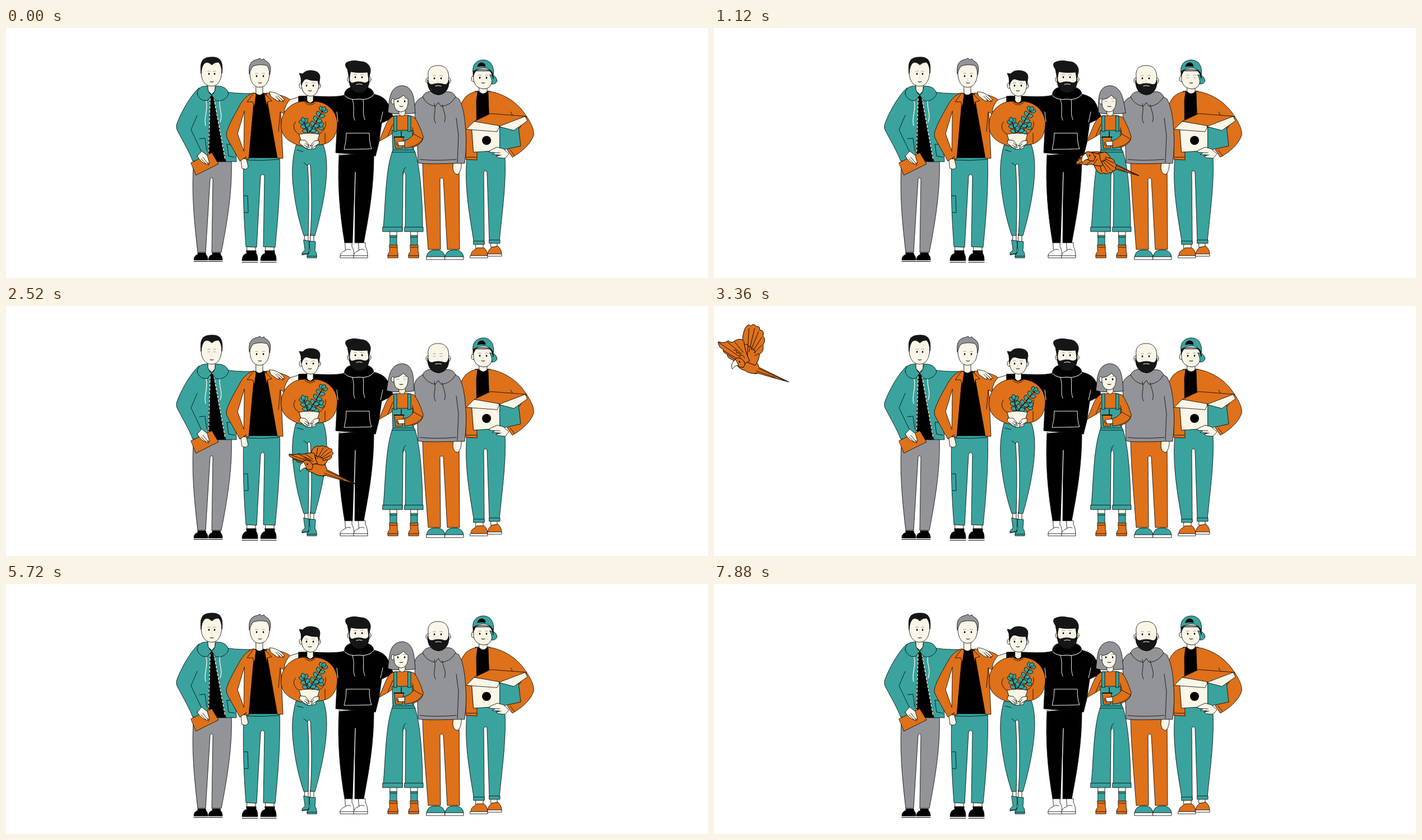
An HTML page with a canvas that plays this animation: 1252x447 px, repeating every 8 s.

```html
<!DOCTYPE html>
<html lang="en">
<head>
<meta charset="utf-8">
<title>Team and parrot</title>
<style>
html, body { margin: 0; width: 100%; height: 100%; overflow: hidden; background: #fff; }
canvas { display: block; width: 1252px; height: 447px; }
</style>
</head>
<body>
<canvas id="stage" width="1252" height="447"></canvas>
<script>
const c = document.getElementById('stage').getContext('2d');
const TEAL = '#3aa39e', ORANGE = '#de711a', GREY = '#939498', CREAM = '#f9f5e7';
const BLACK = '#000', HAIR = '#161616', WHITE = '#fff', LOOP = 8000;
const cache = {};
const path = d => cache[d] ||= new Path2D(d);

function paint(p, fill, stroke = BLACK, w = .8) {
  if (fill) { c.fillStyle = fill; c.fill(p); }
  if (stroke) { c.strokeStyle = stroke; c.lineWidth = w; c.stroke(p); }
}
const shape = (fill, d, stroke, w) => paint(path(d), fill, stroke, w);
const line = (d, stroke = BLACK, w = .8) => shape(null, d, stroke, w);
function oval(fill, x, y, rx, ry, turn = 0, stroke) {
  const p = new Path2D();
  p.ellipse(x, y, rx, ry, turn, 0, Math.PI * 2);
  paint(p, fill, stroke);
}
function about(x, y, change, draw) {
  c.save(); c.translate(x, y); change(); c.translate(-x, -y); draw(); c.restore();
}
const bump = (t, mid, half) =>
  Math.abs(t - mid) < half ? Math.cos((t - mid) / half * Math.PI / 2) ** 2 : 0;
const closed = (t, ...mids) => mids.some(m => Math.abs(t - m) < 85);

function face(x, y, gap, shut, mouthY) {
  for (const ex of [x - gap, x + gap]) {
    if (shut) line(`M${ex - 2} ${y}h4`, '#666', .6);
    else oval(BLACK, ex, y, 1.3, 1.8, 0, null);
    line(`M${ex - 2.5} ${y - 4.5}q2.5 -1.5 5 0`, '#666', .6);
  }
  line(`M${x} ${y + 3}q-2 5 1 5`, '#c9c3b4', .5);
  if (mouthY) line(`M${x - 3} ${mouthY}q3 1.5 6 0`, BLACK, 1);
}

function hoodieTeal(t) {
  shape(GREY, 'M335 236L402 236C404 290 394 350 384 401L367 401L369 270Q367 265 364 270L356 401L342 401C336 350 330 290 335 236Z');
  for (const x of [335, 361]) {
    shape(BLACK, `M${x + 7} 402h14l1 4Q${x + 25} 408 ${x + 25} 415H${x}Q${x} 407 ${x + 7} 405Z`);
    line(`M${x} 417.5h25`, BLACK, 1.2);
  }
  shape(BLACK, 'M362 116H374L393 239H358Z');
  shape(TEAL, 'M384 112Q402 118 445 117L445 150L406 160L411 239L392 239L370 122Z');
  shape(TEAL, 'M344 107C325 125 308 160 304 174Q303 180 307 186C316 203 327 222 333 238L340 238H360L364 122Z');
  line('M341 156L330 182L349 222M345 198L355 197L358 220M394 208L407 208M394 208L397 229L408 231');
  c.setLineDash([4, 3]);
  line('M364 126L361 236M371 126L391 236', CREAM, 1.4);
  c.setLineDash([]);
  shape(CREAM, 'M360 98H373V112L367 119L360 112Z');
  shape(TEAL, 'M341 117C342 106 351 103 360 104L360 110Q363 119 367 119Q372 117 373 110L374 104C387 103 395 108 397 118C393 128 382 133 373 129L367 120L360 129C351 132 343 126 341 117Z');
  line('M357 131C361 148 352 158 356 174M381 131C380 146 387 154 382 168', CREAM, 1.3);
  shape(ORANGE, 'M330 241L367 223L379 243L339 263Z');
  shape(CREAM, 'M341 229L349 220L359 228L363 242L359 241L362 245L357 243Q348 241 341 229Z');
  line('M351 231L359 241M348 234L357 243');
  shape(CREAM, 'M348 74C347 94 355 104 367 104C379 104 385 92 385 73L381 56H352Z');
  shape(HAIR, 'M348 81C346 64 347 52 367 52C386 51 387 66 385 81Q385 67 379 61Q372 61 367 66Q360 59 354 63Q349 68 348 81Z');
  face(367, 82, 5, closed(t, 2530, 5050, 7590), 96);
}

function jacketOrange(t) {
  for (const x of [421, 454]) {
    shape(CREAM, `M${x + 9} 388h15v12h-15Z`);
    shape(BLACK, `M${x + 8} 398h17v5Q${x + 28} 406 ${x + 28} 416H${x}Q${x} 405 ${x + 8} 403Z`);
    line(`M${x} 419h28`, BLACK, 1.2);
  }
  shape(TEAL, 'M424 230H488C490 290 484 350 480 392L459 391L461 265Q458 258 454 265L447 392L428 391C424 340 422 290 424 230Z');
  line('M426 236Q456 238 487 235M424 300H431L432 330H425');
  shape(CREAM, 'M419 234L428 232L432 248Q430 255 421 251Z');
  shape(BLACK, 'M442 117H464L484 232H432Z');
  shape(ORANGE, 'M465 116C485 118 505 123 510 132L497 155L490 150L494 233L484 233L464 120Z');
  shape(ORANGE, 'M441 116Q430 119 420 133C408 154 397 173 393 188Q392 195 397 202L417 238L429 230L424 234H433L443 121Z');
  shape(WHITE, 'M425 149L413 189L424 220Z');
  line('M489 150L486 185');
  shape(CREAM, 'M446 98H458V117Q452 123 446 117Z');
  shape(ORANGE, 'M442 116L430 132L440 132L443 141L446 119ZM460 116L474 130L466 132L465 141L461 119Z');
  shape(CREAM, 'M470 114Q481 114 491 122L497 129L494 130L490 126L495 132L491 131L486 127L488 131L483 130L472 122Z');
  line('M484 121L490 126M481 122L486 127');
  shape(CREAM, 'M435 77C434 96 442 106 452 106C464 106 471 94 470 74L464 62H440Z');
  shape(GREY, 'M434 82C432 65 437 58 449 56L453 54L456 57L460 55L462 58C471 62 474 70 470 84Q470 72 465 67Q452 64 441 68Q437 72 434 82Z');
  face(453, 86, 6, closed(t, 1500, 5050), 98);
}

function hoodieBlack(t) {
  shape(CREAM, 'M524 123L507 128Q498 136 496 150L508 145L524 136Z');
  shape(BLACK, 'M594 226H656C656 290 646 340 638 384L622 384L623 262L618 384L604 384C595 330 591 280 594 226Z');
  line('M623 258L619 384M594 227Q625 223 656 228', WHITE, 1.2);
  shape(BLACK, 'M522 122C550 120 580 126 605 120L655 118Q676 122 682 137L691 160L670 170L665 205L659 229L588 223L591 165L583 150L522 136Z');
  shape(CREAM, 'M622 105H637V112H622Z');
  shape(BLACK, 'M603 120Q604 107 619 105Q630 118 641 105Q655 108 656 118Q645 130 630 128Q610 130 603 120Z', '#444');
  line('M604 121Q613 130 629 127Q647 130 656 119M618 128C623 145 617 154 622 165M637 128C639 144 635 151 640 164M607 188H648Q648 207 652 216Q625 217 603 217Q607 203 607 188M590 150L592 168M672 150L668 168', CREAM, 1);
  for (const x of [596, 620]) {
    shape(WHITE, `M${x + 9} 384h12v7Q${x + 25} 396 ${x + 25} 411H${x}Q${x - 2} 402 ${x + 9} 398Z`);
    line(`M${x} 407h25M${x + 10} 397q5 -3 9 0`);
  }
  oval(CREAM, 612, 92, 3, 5);
  oval(CREAM, 648, 92, 3, 5);
  shape(CREAM, 'M613 76H647V98Q643 113 630 114Q616 113 613 98Z');
  shape(HAIR, 'M612 90L609 74Q603 66 607 62Q617 56 633 60C646 60 653 72 649 82L647 92L645 79Q628 81 615 78Z');
  shape(HAIR, 'M612 91Q614 100 619 98Q629 94 639 98Q645 99 648 91C648 106 642 116 630 116C618 116 612 106 612 91Z');
  line('M625 101q5 -2 10 0', CREAM, 1.2);
  face(629, 88, 6, closed(t, 3900), 0);
}

const leaf = (x, y, a) => oval(TEAL, x + Math.cos(a) * 4.5, y + Math.sin(a) * 4.5, 5, 3.5, a);
function stem(x, y, dx, dy, n) {
  const a = Math.atan2(dy, dx);
  for (let i = 1; i <= n; i++) {
    const k = (i - .3) / n, px = x + dx * k, py = y + dy * k;
    leaf(px, py, a - 1); leaf(px, py, a + 1);
  }
  leaf(x + dx * .93, y + dy * .93, a);
  line(`M${x} ${y}l${dx} ${dy}`, BLACK, 1);
}

function plantHolder(t) {
  shape(CREAM, 'M533 368h6v16h-6ZM543 368h6v18h-6Z');
  shape(TEAL, 'M531 379L541 381L540 403L528 406V402L533 397ZM541 381L552 382L551 398Q555 402 554 411H537V405L542 399Z');
  line('M529 404H540M537 408H554');
  shape(TEAL, 'M517 210C510 235 509 260 513 290C518 330 526 355 531 371H539C540 330 541 290 538 246Q540 240 543 246C546 300 545 340 543 371H551C560 340 572 290 572 250Q572 225 566 209Z');
  line('M538 246L531 241M519 218L530 221');
  shape(CREAM, 'M537 116H548V130Q542 138 537 130Z');
  shape(ORANGE, 'M534 131C515 130 497 143 492 162C487 186 495 201 525 211L558 209C581 208 591 192 591 170C589 148 574 133 551 131Q543 138 534 131Z');
  line('M533 133Q542 142 552 133M516 168Q507 181 525 192M570 167Q573 181 557 191M569 188V206');
  about(540, 192, () => c.rotate(bump(t, 3360, 380) * .16), () => {
    stem(540, 191, -9, -24, 3);
    stem(543, 190, 17, -15, 2);
    stem(540, 190, 26, -44, 5);
  });
  shape(CREAM, 'M523 190Q540 186 559 190L552 215Q541 220 530 213Z');
  shape(CREAM, 'M525 200L534 201L541 210L538 209L541 214L536 212L538 217L532 213L523 206Z');
  shape(CREAM, 'M558 201L550 202L542 211L546 210L545 216L550 212L558 207Z');
  line('M534 206L538 209M532 209L536 212M549 207L546 211');
  oval(CREAM, 526, 103, 3, 5);
  oval(CREAM, 558, 103, 3, 5);
  shape(CREAM, 'M527 91H558V104Q555 122 543 122Q530 121 527 105Z');
  shape(HAIR, 'M527 102L526 89L523 81L529 82Q535 75 545 76Q560 77 560 88L558 102L556 94Q545 95 536 91Q530 92 527 102Z');
  face(542, 103, 6, closed(t, 5050, 7590), 112);
}

function girl(t) {
  for (const x of [681, 718]) {
    shape(CREAM, `M${x + 4} 362h12v10h-12Z`);
    shape(TEAL, `M${x + 4} 371h12v18h-12Z`);
    line(`M${x + 4} 374h12`);
    shape(ORANGE, `M${x + 3} 388h14v11Q${x + 19} 403 ${x + 18} 411H${x}Q${x - 1} 403 ${x + 3} 400Z`);
    line(`M${x} 407h18M${x + 4} 392h12`);
  }
  shape(ORANGE, 'M693 157Q683 159 677 174L665 203L681 194L690 188L690 216H727L727 213C738 209 744 202 744 194Q737 171 728 159L716 156Z');
  line('M690 172L681 193M725 178L728 194L711 202');
  shape(TEAL, 'M689 183H725V214L729 220C739 248 743 310 743 357V363H712L713 262Q710 253 708 262L707 363H673V357C677 310 677 250 690 218Z');
  shape(TEAL, 'M672 356H707V364H672ZM711 356H744V364H711Z');
  line('M689 218H727M688 222H729M713 249Q708 252 708 262');
  shape(TEAL, 'M692 157H697V185H692ZM717 157H722V185H717Z');
  shape(ORANGE, 'M693 195H709L707 215H695Z');
  line('M692 195H710M705 194V185', BLACK, 1.4);
  shape(CREAM, 'M711 202L699 203L696 205L700 206L696 208L701 209L698 211L711 210Z');
  shape(ORANGE, 'M727 190Q719 200 711 201V215Q735 212 743 199Z');
  const sway = bump(t, 1120, 360) - .6 * bump(t, 2480, 300);
  about(706, 104, () => c.transform(1, 0, sway * .09, 1, 0, 0), () =>
    shape(GREY, 'M681 151C684 135 681 105 706 103C730 104 728 135 730 152Q718 154 706 153Q692 155 681 151Z'));
  shape(CREAM, 'M701 145H712V154Q706 161 701 154Z');
  oval(CREAM, 690, 131, 3, 5);
  shape(CREAM, 'M692 128Q702 127 709 120Q712 125 717 127V135Q715 150 704 150Q692 148 692 135Z');
  face(705, 131, 6, closed(t, 1120, 2500, 4150, 6360), 140);
}

function bald(t) {
  shape(ORANGE, 'M743 240H808L809 396H787L780 270Q777 266 774 270L775 396H753C749 340 744 290 743 240Z');
  shape(CREAM, 'M798 239H812Q813 255 806 262Q798 261 797 251Z');
  for (const x of [750, 783]) {
    shape(TEAL, `M${x} 409Q${x + 2} 397 ${x + 14} 397H${x + 22}Q${x + 32} 400 ${x + 33} 409Z`);
    shape(WHITE, `M${x} 409h33v5h-33Z`);
  }
  shape(GREY, 'M749 121C735 125 729 133 728 143L733 190L735 241Q740 244 805 242L818 242Q822 210 820 185Q818 144 808 127L797 120Z');
  line('M803 161L807 192L805 240M738 235Q765 238 803 235');
  shape(CREAM, 'M764 106H780V120H764Z');
  shape(GREY, 'M743 123Q746 114 759 113Q771 126 784 114Q797 112 802 123Q793 139 776 140L771 133L766 140Q750 138 743 123Z');
  line('M764 135C768 151 760 158 766 170M778 137C780 150 786 156 782 168');
  oval(CREAM, 752, 94, 3, 5);
  oval(CREAM, 790, 94, 3, 5);
  shape(CREAM, 'M753 87C751 73 759 67 771 67C784 67 792 76 789 95Q784 114 771 115Q757 114 753 96Z');
  shape(HAIR, 'M752 93Q754 102 760 101Q771 97 782 101Q788 102 790 93C791 109 783 119 771 119C759 119 751 109 752 93Z');
  line('M766 104q5 -2 10 0', CREAM, 1.2);
  face(770, 90, 6, closed(t, 2530, 5050, 7590), 0);
}

function capMan(t) {
  shape(CREAM, 'M838 383h13v12h-13ZM865 382h11v10h-11Z');
  shape(ORANGE, 'M829 407Q829 399 837 396L840 393H852Q858 396 859 407ZM859 404Q860 396 867 392L877 390Q884 396 884 404Z');
  shape(WHITE, 'M828 407H859V411H828ZM859 404H884V408H859Z');
  shape(TEAL, 'M823 220H889C894 270 884 335 880 381H862L858 258Q855 252 852 258L853 386H835C826 330 816 280 823 220Z');
  shape(TEAL, 'M834 381H853V387H834ZM862 379H881V385H862Z');
  shape(BLACK, 'M837 113H864V170H837Z');
  shape(ORANGE, 'M841 113Q823 116 816 128L809 140L820 190V235L840 236L839 130Z');
  shape(ORANGE, 'M860 113C885 116 906 130 919 145C934 164 943 181 941 192C935 210 916 224 903 231L894 218L912 195L900 168L862 168Z');
  line('M900 150L913 174M821 231H839M899 218L907 228');
  shape(CREAM, 'M844 102H858V114Q851 121 844 114Z');
  oval(CREAM, 833, 91, 3, 5);
  shape(CREAM, 'M834 77H868V93Q865 109 852 109Q837 108 834 94Z');
  shape(TEAL, 'M863 84Q873 83 876 94Q874 101 866 100Q868 94 863 84Z');
  shape(HAIR, 'M833 86V75H869V91Q867 80 862 76Q848 73 838 76Q836 80 833 86Z');
  shape(TEAL, 'M833 78C831 65 840 57 852 57C866 58 871 70 869 83Q866 75 857 72Q843 70 833 78Z');
  shape(BLACK, 'M841 69Q842 62 849 62Q855 63 855 69Q848 67 841 69Z');
  face(851, 89, 6, closed(t, 1120, 3800), 98);
}

function boxBack() {
  shape(ORANGE, 'M835 167L864 153L929 158L916 179L880 177Z');
}
function boxFront() {
  shape(CREAM, 'M831 181L881 177V219L834 222Z');
  shape(TEAL, 'M881 177L914 177L918 211L881 219Z');
  shape(CREAM, 'M821 181L835 167L881 175L876 185Z');
  shape(CREAM, 'M879 176L926 158L930 166L906 183Z');
  oval(BLACK, 857, 201, 8, 8, 0, null);
  shape(CREAM, 'M863 219L876 213L887 216L897 225L890 233L878 232L874 229L880 227L867 226L872 223L862 222Z');
  line('M872 223L881 223M874 229L883 227');
}

const farWing = path('M-16 8C-20 -12 -20 -38 -14 -50Q-8 -60 -4 -54Q2 -60 6 -53Q13 -55 12 -47Q21 -47 18 -36Q24 -30 18 -20Q20 -8 12 -4Q10 10 4 16Z');
const farLines = path('M-10 0L-7 -50M-7 -8L3 -50M-3 -12L10 -44M0 -10L16 -34M2 -6L16 -20M3 -1L11 -5M-15 -20Q-10 -24 -8 -17Q-3 -20 -2 -13Q4 -14 4 -6');
const nearWing = path('M-20 16Q-34 14 -36 6Q-46 4 -46 -4Q-54 -6 -53 -12Q-62 -16 -62 -26Q-50 -22 -44 -28Q-38 -22 -32 -28Q-20 -34 -16 -26Q-14 -8 -6 8Z');
const nearLines = path('M-22 2L-60 -24M-24 7L-52 -10M-25 10L-45 -3M-20 -4L-46 -26M-17 -7L-33 -26M-34 -11Q-28 -12 -29 -6Q-23 -8 -23 -1Q-17 -4 -15 3');

// s: 1 raised, -1 lowered; a lowered wing also leans by the given shear
function wing(outline, lines, s, shear) {
  const k = (1 - s) * shear;
  const m = new DOMMatrix([1, 0, -k, s, 8 * k, 8 * (1 - s)]);
  for (const [p, fill] of [[outline, ORANGE], [lines, null]]) {
    const q = new Path2D();
    q.addPath(p, m);
    paint(q, fill, BLACK, fill ? 1 : .9);
  }
}

// Each flight: time, x, y
const flights = [
  [[0, 850, 190], [240, 850, 96], [840, 716, 238], [1120, 694, 218], [1680, 640, 262], [2080, 600, 308], [2520, 562, 273], [3360, 70, 90], [3750, -150, 100]],
  [[4480, 1330, 165], [5040, 1017, 44], [5320, 960, -90], [5800, 995, -110], [6360, 935, 73], [6640, 862, 192]]
];
function place(keys, t) {
  const i = Math.min(keys.findLastIndex(k => k[0] <= t), keys.length - 2);
  const a = keys[i], b = keys[i + 1], before = keys[i - 1] || a, after = keys[i + 2] || b;
  const d = b[0] - a[0], u = (t - a[0]) / d;
  return [1, 2].map(n => {
    const m = (b[n] - before[n]) / (b[0] - before[0]) * d;
    const e = (after[n] - a[n]) / (after[0] - a[0]) * d;
    return a[n] * (1 + 2 * u) * (1 - u) ** 2 + m * u * (1 - u) ** 2 +
      b[n] * u * u * (3 - 2 * u) + e * u * u * (u - 1);
  });
}
const ramp = (t, a, b) => Math.max(0, Math.min(1, (t - a) / (b - a)));

function bird(t) {
  const keys = flights.find(k => t >= k[0][0] && t < k.at(-1)[0]);
  if (!keys || t < 30) return;
  const [x, y] = place(keys, t);
  const size = Math.min(.2 + ramp(t, 0, 230) * .8, 1 - ramp(t, 6440, 6640) * .8);
  const landing = ramp(t, 6080, 6340);
  const beat = Math.cos(2 * Math.PI * (t - 3360) / (t < 3360 ? 300 : 280));
  const flap = beat > 0 ? beat ** .6 : beat * .55;
  const s = flap * (1 - landing) - 1.25 * landing;
  c.save();
  c.translate(x, y);
  c.rotate(-.375 * ramp(t, 5800, 6300));
  c.scale(size, size);
  shape(HAIR, 'M-2 27Q2 34 9 30L8 25Z');
  shape(ORANGE, 'M-32 8C-18 0 6 0 11 20L64 46L42 40L8 30Q-4 33 -15 25Q-26 24 -32 8Z', BLACK, 1);
  line('M10 22L56 43M6 26L40 38');
  wing(farWing, farLines, s, .05);
  wing(nearWing, nearLines, s, .3);
  shape(ORANGE, 'M-34 11Q-33 2 -25 3Q-16 5 -14 14L-17 20Q-24 20 -28 17Z', BLACK, 1);
  shape(CREAM, 'M-31 6Q-41 12 -37 23Q-33 17 -26 16Z');
  oval(BLACK, -24, 10, 1.4, 1.4, 0, null);
  c.restore();
}

function draw(t) {
  c.fillStyle = WHITE;
  c.fillRect(0, 0, 1252, 447);
  const boxed = t < 260 || t > 6480;
  const squash = part => about(851, 412, () => c.scale(1, 1 - .015 * bump(t, 6720, 200)), part);
  hoodieTeal(t);
  jacketOrange(t);
  hoodieBlack(t);
  plantHolder(t);
  squash(() => capMan(t));
  bald(t);
  girl(t);
  squash(boxBack);
  if (boxed) bird(t);
  squash(boxFront);
  if (!boxed) bird(t);
}

c.lineJoin = c.lineCap = 'round';
const start = performance.now();
function tick() {
  draw((performance.now() - start) % LOOP);
  requestAnimationFrame(tick);
}
tick();
</script>
</body>
</html>
```
